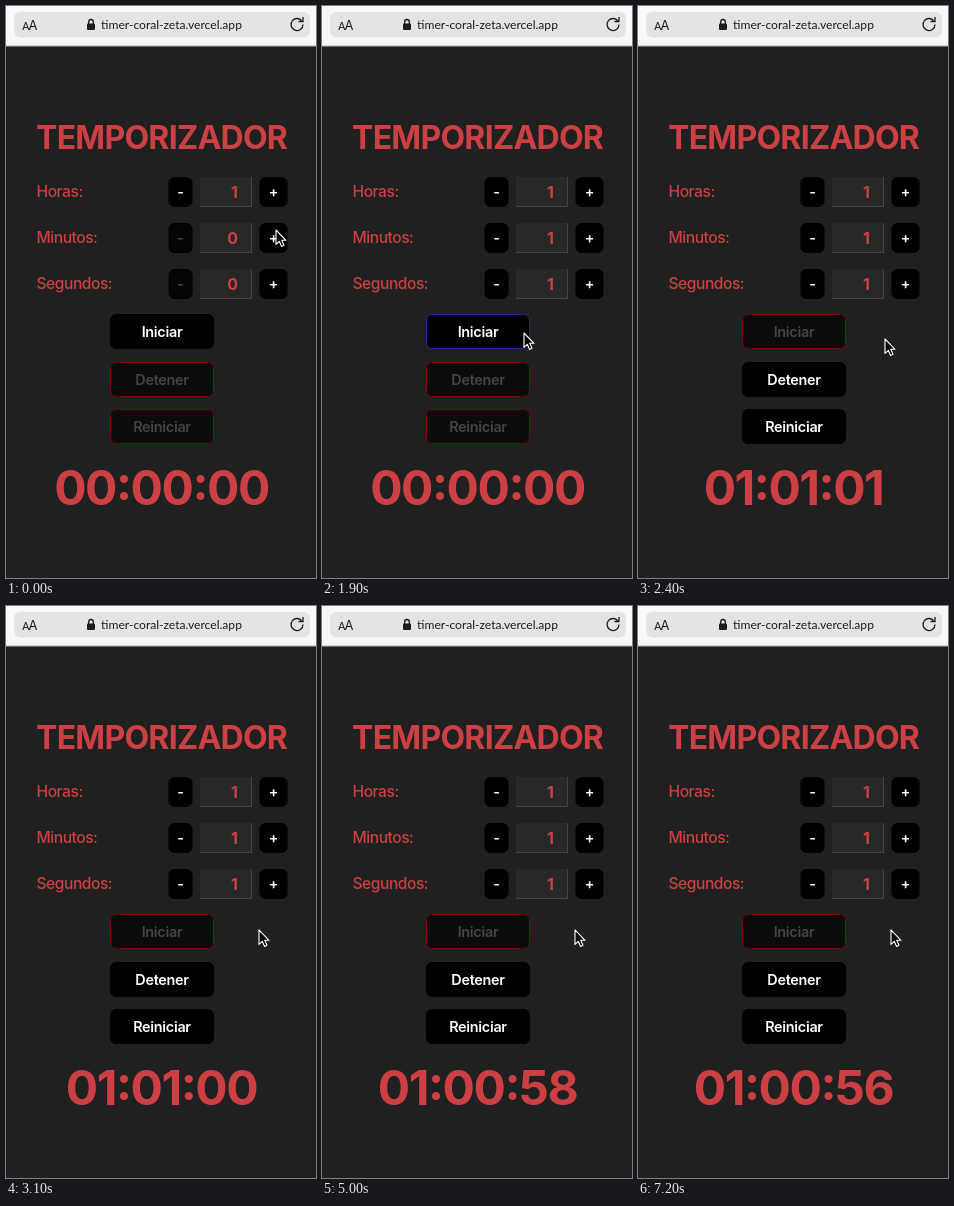
An HTML page for the animation above (8 s loop, 310 by 572 pixels).

```html
<!DOCTYPE html>
<html lang="es">
<head>
<meta charset="utf-8">
<title>Temporizador</title>
<style>
  html, body { margin: 0; width: 100%; height: 100%; overflow: hidden; background: #202020; }
  svg { display: block; width: 310px; height: 572px; font-family: Inter, "Liberation Sans", sans-serif; }
  text { white-space: pre; }
  .red { fill: #cc4043; }
  .title { font-size: 32px; font-weight: 700; letter-spacing: -.023em; }
  .clock { font-size: 48px; font-weight: 700; letter-spacing: -.03em; font-kerning: none; font-feature-settings: "case"; }
  .label { font-size: 15.6px; font-weight: 500; letter-spacing: -.03em; }
  .value { font-size: 16px; font-weight: 700; }
  .button { font-size: 14.4px; font-weight: 600; letter-spacing: -.02em; }
  .url { font: 12.1px Lato, "Open Sans", sans-serif; }
</style>
</head>
<body>
<svg id="stage" viewBox="0 0 310 572">
  <rect width="310" height="572" fill="#202020"/>
  <rect width="310" height="40" fill="#f8f8f8"/>
  <rect y="39.5" width="310" height="1" fill="#b4b4b4"/>
  <rect x="8" y="6" width="296" height="25.5" rx="6" fill="#e4e4e4"/>
  <g fill="#1c1c1c">
    <text x="16" y="23.5" font-size="11">A</text>
    <text x="22.5" y="23.5" font-size="13">A</text>
    <rect x="81" y="17.5" width="8" height="6.5" rx="1"/>
    <path d="M82.7 18v-2.2a2.3 2.3 0 0 1 4.6 0V18" fill="none" stroke="#1c1c1c" stroke-width="1.4"/>
    <text class="url" x="95" y="23">timer-coral-zeta.vercel.app</text>
  </g>
  <path d="M296.2 15.5A6 6 0 1 0 297 18.5M297 11v4.5h-4.5" fill="none" stroke="#1c1c1c" stroke-width="1.3"/>
  <text class="red title" x="155.6" y="143" text-anchor="middle">TEMPORIZADOR</text>
  <g id="form"></g>
  <text id="clock" class="red clock" x="155.5" y="498.5" text-anchor="middle"></text>
  <path id="cursor" d="M0 0V14.4L3.3 11.3 5.6 16.4 8 15.3 5.8 10.3H10Z" fill="#0a0a0a" stroke="#fff" stroke-width="1.1" stroke-linejoin="round"/>
</svg>
<script>
const LOOP = 8000, STEP = 100, FADE = 250;
const MINUTE_CLICK = 300, SECOND_CLICK = 800, HOVER = 1500, START = 2000;
const TICKS = [3000, 4100, 5000, 6000, 7100];
// time, x, y of the pointer tip
const PATH = [
  [0, 270, 224], [300, 268, 226], [700, 266, 272], [1000, 266, 274],
  [1200, 259, 286], [1600, 202, 327], [2000, 202, 327],
  [2400, 247, 333], [2600, 253, 324], [LOOP, 253, 324]
];
const BLACK = [0, 0, 0], WINE = [108, 2, 8], BLUE = [42, 38, 138];

const $ = id => document.getElementById(id);
const form = $('form');

function add(tag, attrs, text = '') {
  const el = document.createElementNS('http://www.w3.org/2000/svg', tag);
  for (const k in attrs) el.setAttribute(k, attrs[k]);
  el.textContent = text;
  return form.appendChild(el);
}

function addButton(x, y, w, h, label, offFill = '#0c0c0c') {
  const box = add('rect', { x: x + .5, y: y + .5, width: w - 1, height: h - 1, rx: 5.5 });
  const text = add('text', {
    class: 'button', x: x + w / 2, y: y + h / 2 + 5, 'text-anchor': 'middle'
  }, label);
  return (on, border) => {
    box.setAttribute('fill', on ? '#000' : offFill);
    box.setAttribute('stroke', `rgb(${border})`);
    text.setAttribute('fill', on ? '#fff' : '#444');
  };
}

function addRow(y, label) {
  add('text', { class: 'red label', x: 30.5, y: y + 20 }, label);
  const minus = addButton(162.5, y, 24, 30, '-', '#040404');
  add('rect', { x: 194, y, width: 52, height: 30, fill: '#282828' });
  add('path', { d: `M194 ${y + 29.5}H245.5V${y}`, fill: 'none', stroke: '#444' });
  const value = add('text', { class: 'red value', x: 232, y: y + 20.5, 'text-anchor': 'end' });
  addButton(253.5, y, 28, 30, '+')(true, BLACK);
  return n => {
    value.textContent = n;
    minus(n > 0, BLACK);
  };
}

const hours = addRow(171, 'Horas:');
const minutes = addRow(217, 'Minutos:');
const seconds = addRow(263, 'Segundos:');
const start = addButton(104, 308, 104, 35, 'Iniciar');
const stop = addButton(104, 356, 104, 35, 'Detener');
const reset = addButton(104, 403, 104, 35, 'Reiniciar');

const mix = (a, b, k) => a.map((v, i) => Math.round(v + (b[i] - v) * k));
const fade = (from, to, t, at) => mix(from, to, Math.min(1, Math.max(0, (t - at) / FADE)));

function pointAt(t) {
  const i = PATH.findIndex(p => p[0] > t);
  const [t0, ...a] = PATH[i - 1], [t1, ...b] = PATH[i];
  const k = (t - t0) / (t1 - t0);
  return a.map((v, j) => v + (b[j] - v) * k);
}

function clockAt(t) {
  if (t < START) return '00:00:00';
  const left = 3661 - TICKS.filter(at => t >= at).length;
  return [left / 3600, left / 60 % 60, left % 60]
    .map(n => String(Math.floor(n)).padStart(2, '0')).join(':');
}

function render(t) {
  const running = t >= START;
  hours(1);
  minutes(t >= MINUTE_CLICK ? 1 : 0);
  seconds(t >= SECOND_CLICK ? 1 : 0);
  start(!running, running ? fade(BLUE, WINE, t, START) : fade(BLACK, BLUE, t, HOVER));
  const border = fade(WINE, BLACK, t, START);
  stop(running, border);
  reset(running, border);
  $('clock').textContent = clockAt(t);
  $('cursor').setAttribute('transform', `translate(${pointAt(t)})`);
}

function loop() {
  render(Math.floor(performance.now() % LOOP / STEP) * STEP);
  requestAnimationFrame(loop);
}
loop();
</script>
</body>
</html>
```
